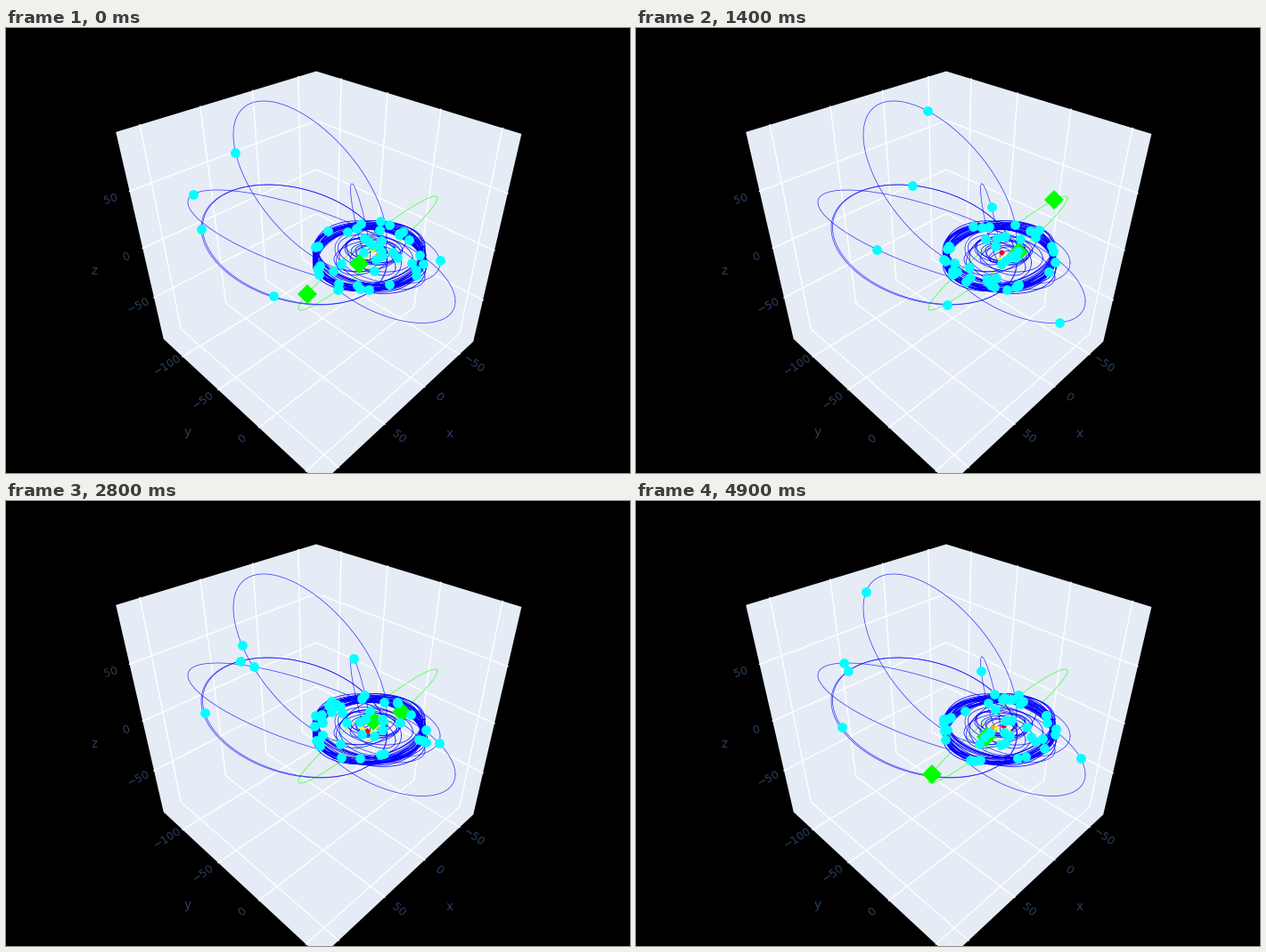
A matplotlib script that plays this animation: 700 px wide and 500 px high, repeating every 5000 ms.

```python
import numpy as np
import matplotlib.pyplot as plt
from matplotlib.animation import FuncAnimation

W, H, DPI = 700, 500, 100
FRAMES, INTERVAL = 50, 100
PX = 72 / DPI
SUN = np.array([408.0, 256.0])
TURN = 2 * np.pi
rng = np.random.default_rng(11)

plt.rcParams["font.family"] = "DejaVu Sans"
fig = plt.figure(figsize=(W / DPI, H / DPI), dpi=DPI, facecolor="black")
ax = fig.add_axes([0, 0, 1, 1])
ax.set(xlim=(0, W), ylim=(H, 0))
ax.axis("off")


# Camera at (1.25, 1.25, 1.25) looking at the middle of the box
def project(x, y, z):
    depth = 1.25 * 3 ** 0.5 - (x + y + z) / 3 ** 0.5
    scale = 250 / np.tan(np.pi / 8) / depth
    return (W / 2 + scale * (y - x) / 2 ** 0.5,
            H / 2 - scale * (2 * z - x - y) / 6 ** 0.5)


HX, HY, HZ = 0.494, 0.5055, 0.5025
STEP = 0.261
X_TICKS = -0.121 + STEP * np.arange(-1, 3)
Y_TICKS = 0.172 + STEP * np.arange(-2, 2)
Z_TICKS = 0.006 + STEP * np.arange(-1, 2)


def draw_box():
    outline = [(HX, -HY, HZ), (-HX, -HY, HZ), (-HX, HY, HZ),
               (-HX, HY, -HZ), (HX, HY, -HZ), (HX, -HY, -HZ)]
    ax.fill(*zip(*(project(*p) for p in outline)), color="#e5ecf6", lw=0)
    paths = [[(x, HY, -HZ), (x, -HY, -HZ), (x, -HY, HZ)] for x in X_TICKS]
    paths += [[(HX, y, -HZ), (-HX, y, -HZ), (-HX, y, HZ)] for y in Y_TICKS]
    paths += [[(HX, -HY, z), (-HX, -HY, z), (-HX, HY, z)] for z in Z_TICKS]
    for path in paths:
        ax.plot(*zip(*(project(*p) for p in path)), color="white", lw=1.4 * PX)


def draw_labels():
    ticks = [("50", 118, 192, 17), ("0", 135, 257, 20), ("−50", 149, 312, 27),
             ("−100", 181, 379, 33), ("−50", 221, 418, 36), ("0", 265, 462, 40),
             ("−50", 525, 378, -35), ("0", 485, 415, -38), ("50", 440, 459, -40)]
    for text, x, y, angle in ticks:
        ax.text(x, y, text, rotation=angle, color="#2a3f5f", size=12.5 * PX,
                ha="center", va="center")
    for text, x, y in [("x", 498, 456), ("y", 204, 454), ("z", 99, 273)]:
        ax.text(x, y, text, color="#2a3f5f", size=13.5 * PX,
                ha="center", va="center")


class Orbit:
    """Projected ellipse with the sun at its focus; angles in degrees."""

    def __init__(self, cx, cy, rx, ry, tilt, mean, rate, ecc=None, peri=None):
        self.center, self.rx, self.ry = (cx, cy), rx, ry
        self.tilt = np.radians(tilt)
        self.mean, self.rate = mean, rate
        u, v = (SUN[0] - cx) / rx, (SUN[1] - cy) / ry
        w = (v - u * np.cos(self.tilt)) / np.sin(self.tilt)
        self.ecc = min(np.hypot(u, w), 0.95) if ecc is None else ecc
        self.peri = np.arctan2(w, u) if peri is None else np.radians(peri)

    def point(self, t):
        return (self.center[0] + self.rx * np.cos(t),
                self.center[1] + self.ry * np.cos(t - self.tilt))

    def at(self, seconds):
        anomaly = np.linspace(0, TURN, 721)
        mean = np.radians(self.mean + self.rate * seconds) % TURN
        e = np.interp(mean, anomaly - self.ecc * np.sin(anomaly), anomaly)
        return self.point(self.peri + e)

    def draw(self, color, width, alpha=1):
        ax.plot(*self.point(np.linspace(0, TURN, 361)), color=color,
                lw=width * PX, alpha=alpha)


outer = [
    Orbit(341, 178, 86, 96, 52.8, 103, -136.3),
    Orbit(337, 238, 133, 56, 41.2, 237, 154.5, ecc=0.95),
    Orbit(323, 243.5, 104, 67.5, 73.8, 183, 158.5, ecc=0.6),
    Orbit(324, 243.3, 103.5, 67.2, 73.3, 74, 161.3, ecc=0.6),
    Orbit(424, 278.5, 80, 53, 57.5, 271, 180),
    Orbit(428, 256, 59, 31.6, 75.3, -168, 609),
    Orbit(397.5, 218.5, 11, 43.5, -30, 53.6, -476.8, ecc=0.15, peri=-30),
]
belt = [Orbit(408 + rng.uniform(-2.5, 2.5), 257 + rng.uniform(-4.5, 4.5),
              rng.uniform(59, 63), rng.uniform(33, 39),
              rng.uniform(74, 106), rng.uniform(0, 360),
              rng.uniform(480, 680)) for _ in range(28)]
inner = [Orbit(410 + rng.uniform(-0.2, 0.25) * r, 255 + rng.uniform(-0.2, 0.2) * r,
               r, r * rng.uniform(0.45, 0.75), rng.uniform(50, 130),
               rng.uniform(0, 360), rng.uniform(700, 1500))
         for r in np.linspace(13, 42, 13)]
bodies = outer + belt + inner


def big_planet(seconds):
    swing = 10 * np.cos(np.radians(72 * (seconds - 4.4))) - 8
    return planet_path(np.radians(152 - 71.5 * seconds + swing))


def planet_path(t):
    return 406 + 78 * np.cos(t), 253 - 64 * np.cos(t - np.radians(15))


def small_planet(seconds):
    t = np.radians(180 + 72 * (seconds - 4.2))
    return 408 + 23 * np.cos(t), 255.5 - 7 * np.cos(t) - 7 * np.sin(t)


def core_body(seconds, radius, start, rate):
    t = np.radians(start + rate * seconds)
    return SUN[0] + 1 + radius * np.cos(t), SUN[1] - 0.75 * radius * np.sin(t)


def markers(shape, color, size):
    return ax.plot([], [], shape, color=color, ms=size * PX, mew=0)[0]


draw_box()
draw_labels()
ax.plot(*planet_path(np.linspace(0, TURN, 361)), color="#66ff66", lw=PX)
for orbit in outer:
    orbit.draw("blue", 0.75, 0.75)
for orbit in belt:
    orbit.draw("blue", 0.8)
for orbit in inner:
    orbit.draw("blue", 0.8, 0.85)

green = markers("D", "lime", 15)
core = [(markers("D", color, size), radius, start, rate)
        for color, size, radius, start, rate in [
            ("yellow", 5, 10, 80, 420), ("orange", 5, 9, 20, 250),
            ("yellow", 4, 5, 200, 800), ("red", 5, 5, 300, 610)]]
cyan = markers("o", "cyan", 10.8)


def update(frame):
    seconds = frame * INTERVAL / 1000
    green.set_data(*zip(big_planet(seconds), small_planet(seconds)))
    cyan.set_data(*zip(*(body.at(seconds) for body in bodies)))
    for artist, radius, start, rate in core:
        x, y = core_body(seconds, radius, start, rate)
        artist.set_data([x], [y])
    return [green, cyan] + [item[0] for item in core]


anim = FuncAnimation(fig, update, frames=FRAMES, interval=INTERVAL,
                     repeat=True, repeat_delay=0, blit=False)
plt.show()
```
